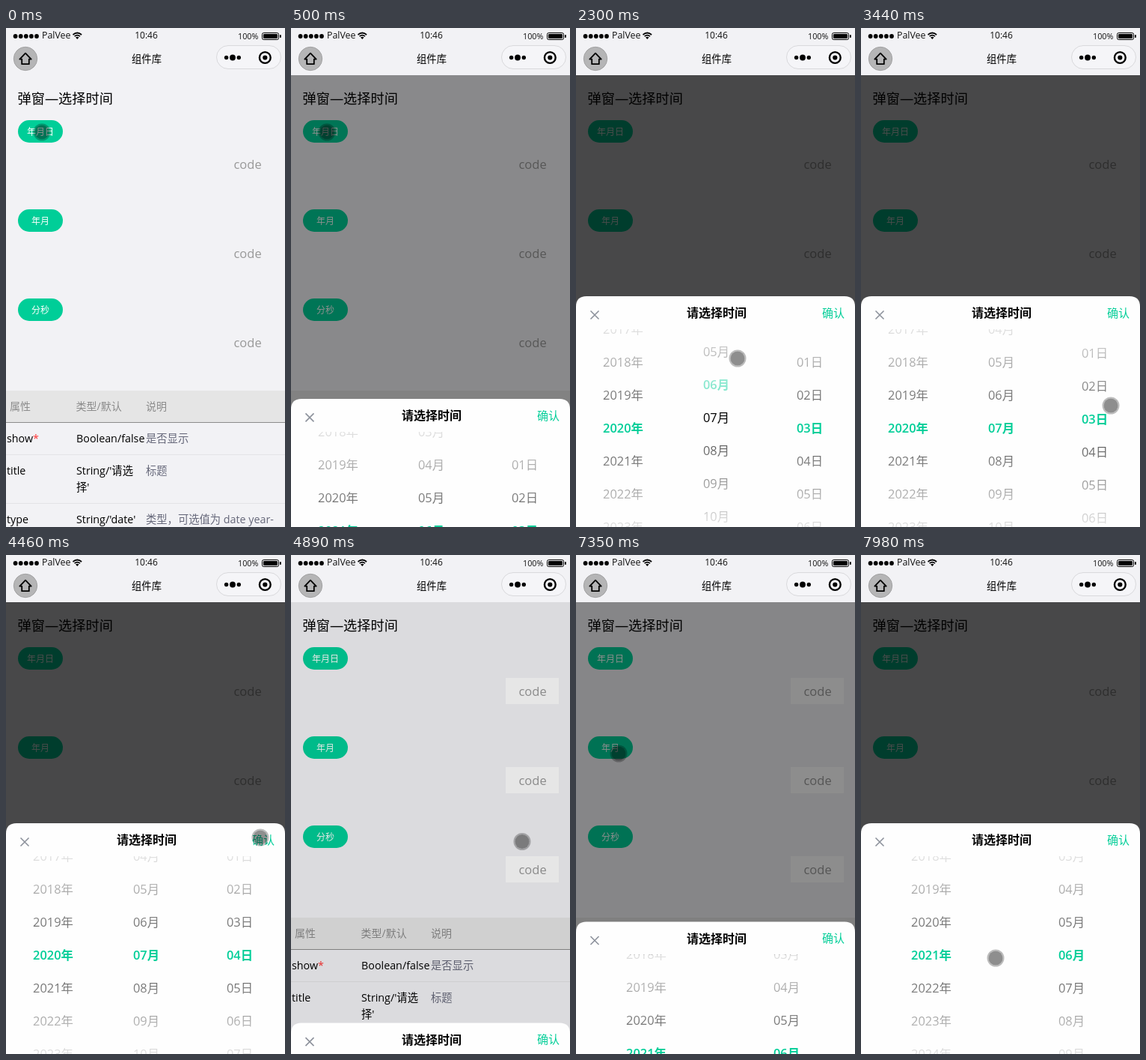
These frames come from a looping animation (373x666 px, 8000 ms). An HTML page:

```html
<!DOCTYPE html>
<html lang="zh-CN">
<head>
<meta charset="utf-8">
<title>时间选择</title>
<style>
html, body { margin: 0; width: 100%; height: 100%; overflow: hidden; background: #f2f2f5; }
svg { display: block; width: 373px; height: 666px; font-family: "Open Sans", "Noto Sans CJK SC", "Noto Sans CJK", sans-serif; }
text { white-space: pre; }
</style>
</head>
<body>
<svg id="stage" viewBox="0 0 373 666">
  <defs>
    <linearGradient id="fadeTop" x1="0" y1="0" x2="0" y2="1">
      <stop offset="0" stop-color="#fefefe" stop-opacity=".89"/>
      <stop offset="1" stop-color="#fefefe" stop-opacity=".38"/>
    </linearGradient>
    <linearGradient id="fadeBottom" x1="0" y1="1" x2="0" y2="0">
      <stop offset="0" stop-color="#fefefe" stop-opacity=".89"/>
      <stop offset="1" stop-color="#fefefe" stop-opacity=".38"/>
    </linearGradient>
    <clipPath id="wheel"><rect y="402" width="373" height="264"/></clipPath>
    <clipPath id="body"><rect y="63" width="373" height="603"/></clipPath>
  </defs>
  <rect width="373" height="666" fill="#f2f2f5"/>
  <g id="bar"></g>
  <g id="page"></g>
  <rect id="shade" y="63" width="373" height="603"/>
  <g clip-path="url(#body)"><g id="sheetA"></g><g id="sheetB"></g></g>
  <g id="toast">
    <rect x="95" y="347" width="186" height="36" rx="6" fill="#4a4a4a"/>
  </g>
  <g id="touch">
    <circle r="9.5" fill-opacity=".44"/>
    <circle r="10.5" fill="none" stroke="#000" stroke-opacity=".26" stroke-width="2"/>
  </g>
</svg>
<script>
const LOOP = 8000, ROW = 44, MID = 534, SHEET_H = 308;
const GREEN = '#00ce98';
const $ = id => document.getElementById(id);

const label = (x, y, str, size, fill = '#000', extra = '') =>
  `<text x="${x}" y="${y}" font-size="${size}" fill="${fill}" ${extra}>${str}</text>`;
const mid = 'text-anchor="middle"';
const line = (y, color) => `<path d="M0 ${y}H373" stroke="${color}"/>`;

function buildBar() {
  let s = '';
  for (let i = 0; i < 5; i++) s += `<circle cx="${12.6 + i * 7.1}" cy="11" r="2.9"/>`;
  s += label(48, 14.4, 'PalVee', 12.4, '#111');
  s += `<g fill="none" stroke="#000" stroke-width="1.7">
    <path d="M89.5 9Q95.3 4 101.1 9M91.6 11.2Q95.3 8 99 11.2"/></g>
    <path d="M93 12.6Q95.3 10.8 97.6 12.6L95.3 15Z"/>`;
  s += label(187.5, 14.4, '10:46', 12, '#111', mid);
  s += label(310, 15, '100%', 10.8, '#111');
  s += `<rect x="342.5" y="6.5" width="22" height="9" rx="2" fill="none" stroke="#000"/>
    <rect x="344" y="8" width="19" height="6" rx="1"/><rect x="366" y="9" width="1.8" height="4" rx=".8"/>`;
  s += `<circle cx="26" cy="41" r="15.7" fill="#b5b5b6" stroke="#a2a2a3"/>
    <path d="M18.3 41.6L26 33.6L33.7 41.6H30.8V48.2H21.2V41.6Z" fill="none" stroke="#000" stroke-width="1.8" stroke-linejoin="round"/>`;
  s += label(188, 46, '组件库', 13.3, '#000', mid);
  s += `<rect x="281.5" y="23.5" width="86" height="31" rx="15.5" fill="#f5f5f8" stroke="#d9d9dc"/>
    <circle cx="294.6" cy="39.5" r="2.7"/><circle cx="303" cy="39.5" r="3.9"/><circle cx="311.3" cy="39.5" r="2.7"/>
    <circle cx="346.3" cy="39.5" r="7.4" fill="none" stroke="#000" stroke-width="2.4"/><circle cx="346.3" cy="39.5" r="3.1"/>`;
  $('bar').innerHTML = s;
}

function buildPage() {
  const grey = '#66687a', head = '#8b8b8b', fs = 14.3;
  let s = label(15.5, 100.5, '弹窗—选择时间', 18.2);
  let boxes = '', codes = '';
  ['年月日', '年月', '分秒'].forEach((name, i) => {
    const y = 123 + i * 119;
    s += `<rect x="16" y="${y}" width="60" height="30" rx="15" fill="${GREEN}"/>`;
    s += label(46, y + 19.6, name, 12, '#fff', mid);
    boxes += `<rect x="287" y="${y + 41}" width="71" height="35" fill="#fefefe"/>`;
    codes += label(304.5, y + 65, 'code', 16.5, '#999');
  });
  s += `<g id="boxes">${boxes}</g>${codes}`;
  s += '<rect y="484" width="373" height="42" fill="#e5e5e5"/>' + line(526.5, '#8c8c8c');
  s += label(5, 510.4, '属性', 14, head) + label(93.5, 510.4, '类型/默认', 14, head) + label(187, 510.4, '说明', 14, head);
  s += label(1, 553, 'show<tspan fill="#f33">*</tspan>', fs) + label(94, 553, 'Boolean/false', fs) + label(187, 553, '是否显示', fs, grey);
  s += line(569.5, '#e3e3e6');
  s += label(1, 596, 'title', fs) + label(94, 596, "String/'请选", fs) + label(94, 618, "择'", fs) + label(187, 596, '标题', fs, grey);
  s += line(634.5, '#e3e3e6');
  s += label(1, 661, 'type', fs) + label(94, 661, "String/'date'", fs) + label(187, 661, '类型，可选值为 date year-', fs, grey);
  $('page').innerHTML = s;
}

// Column: centre x, unit, starting value, drag keys [ms, px], time the pick changes
const sheets = {
  sheetA: [
    { x: 63, unit: '年', val: 2021, keys: [[1130, 0], [1280, 17], [1400, 46], [1550, 44]], pick: 1550, step: -1 },
    { x: 187.5, unit: '月', val: 6, keys: [[2030, 0], [2150, -9], [2300, -58], [2420, -50], [2540, -44]], pick: 2540, step: 1 },
    { x: 312.5, unit: '日', val: 3, keys: [[3320, 0], [3440, -12], [3680, -48], [3940, -44]], pick: 3940, step: 1 }
  ],
  sheetB: [
    { x: 94, unit: '年', val: 2021, keys: [[0, 0]], pick: LOOP, step: 0 },
    { x: 281.5, unit: '月', val: 6, keys: [[0, 0]], pick: LOOP, step: 0 }
  ]
};

function buildSheet(id) {
  let cols = '';
  sheets[id].forEach((c, n) => {
    let rows = '';
    for (let k = -4; k <= 4; k++) {
      const v = c.val + k;
      if (v > 0) rows += label(c.x, MID + 5.8 + k * ROW, String(v).padStart(2, '0') + c.unit, 16.4, '#000', `${mid} data-v="${v}"`);
    }
    cols += `<g id="${id}${n}">${rows}</g>`;
  });
  $(id).innerHTML = `<path d="M0 670V372Q0 358 14 358H359Q373 358 373 372V670Z" fill="#fefefe"/>
    <path d="M19.5 377.5l11 11m0 -11l-11 11" stroke="#8d929c" stroke-width="1.6"/>
    ${label(188, 386.2, '请选择时间', 16, '#000', mid + ' font-weight="700"')}
    ${label(329, 385.8, '确认', 15, GREEN)}
    <g clip-path="url(#wheel)">${cols}</g>
    <rect y="402" width="373" height="110" fill="url(#fadeTop)"/>
    <rect y="556" width="373" height="110" fill="url(#fadeBottom)"/>`;
}

const touchPath = [
  [500, 48, 139], [650, 52, 155], [1130, 92, 500], [1280, 92, 518], [1400, 92, 547], [1550, 93, 547],
  [2030, 203, 500], [2150, 207, 490], [2300, 216, 441], [2540, 216, 441], [2930, 268, 500],
  [3320, 332, 516], [3440, 334, 504], [3680, 334, 468], [3820, 335, 466], [4310, 340, 388], [4460, 340, 377],
  [4770, 340, 377], [5250, 216, 399], [5520, 215.5, 398.5], [5960, 215.5, 398.5], [6080, 126.5, 334.5],
  [6350, 68, 280], [6470, 48.5, 265], [6740, 47.5, 261], [7100, 57, 265], [7350, 57, 265],
  [7470, 72, 284], [7980, 180, 538]
];

// Screen refreshes: [first, last, count], evenly spaced
const refresh = [
  [0, 0, 1], [500, 500, 1], [650, 1130, 5], [1280, 1400, 2], [1550, 2150, 6], [2300, 2540, 3], [2690, 2930, 3],
  [3080, 3680, 6], [3820, 4310, 5], [4460, 4460, 1], [4770, 5250, 5], [5520, 5520, 1], [6080, 6080, 1],
  [6230, 6470, 3], [6740, 7100, 4], [7350, 7470, 2], [7620, 7980, 4]
];
const ticks = refresh.flatMap(([a, b, n]) =>
  Array.from({ length: n }, (_, i) => n > 1 ? a + (b - a) * i / (n - 1) : a));

const clamp = v => Math.max(0, Math.min(1, v));
const ramp = (t, start, len) => clamp((t - start) / len);
const easeOut = (x, pow) => 1 - Math.pow(1 - x, pow);

function track(keys, t) {
  if (t <= keys[0][0]) return keys[0].slice(1);
  for (let i = 1; i < keys.length; i++) {
    const a = keys[i - 1], b = keys[i];
    if (t <= b[0]) {
      const u = (t - a[0]) / (b[0] - a[0]);
      return a.slice(1).map((v, j) => v + (b[j + 1] - v) * u);
    }
  }
  return keys[keys.length - 1].slice(1);
}

function show(id, on) { $(id).style.display = on ? '' : 'none'; }

function drawSheet(id, t, rise) {
  show(id, rise > 0);
  $(id).setAttribute('transform', `translate(0 ${((1 - rise) * SHEET_H).toFixed(2)})`);
  sheets[id].forEach((c, n) => {
    const g = $(id + n), chosen = c.val + (t >= c.pick ? c.step : 0);
    g.setAttribute('transform', `translate(0 ${track(c.keys, t)[0].toFixed(2)})`);
    for (const row of g.children) {
      const on = +row.dataset.v === chosen;
      row.setAttribute('fill', on ? GREEN : '#000');
      row.setAttribute('font-weight', on ? 600 : 400);
    }
  });
}

function draw(now) {
  let t = 0;
  for (const k of ticks) if (k <= now) t = k;

  const openA = t < 500 ? 0 : ramp(t, 400, 300);
  const shut = t < 4770 ? 0 : ramp(t, 4700, 300);
  const openB = t < 7350 ? 0 : ramp(t, 7246, 300);
  const left = Math.pow(1 - shut, 2);
  drawSheet('sheetA', t, easeOut(openA, 2) * left);
  drawSheet('sheetB', t, easeOut(openB, 2));

  const dim = Math.max(easeOut(openA, 2.4) * left, easeOut(openB, 2.4));
  $('shade').setAttribute('opacity', (0.7 * dim).toFixed(3));
  show('boxes', t >= 4770 && t < 7470);

  const toast = ramp(t, 4950, 200) * (1 - ramp(t, 6680, 300));
  $('toast').setAttribute('opacity', toast.toFixed(3));

  const [x, y] = track(touchPath, t);
  $('touch').setAttribute('transform', `translate(${x.toFixed(2)} ${y.toFixed(2)})`);
  show('touch', t < 5250 || t >= 5520);
}

buildBar();
buildPage();
Object.keys(sheets).forEach(buildSheet);
$('toast').innerHTML += label(106, 370.4, '时间值：1593792000000', 14.3, '#fff', 'font-weight="500"');

function frame() {
  draw(performance.now() % LOOP);
  requestAnimationFrame(frame);
}
frame();
</script>
</body>
</html>
```
